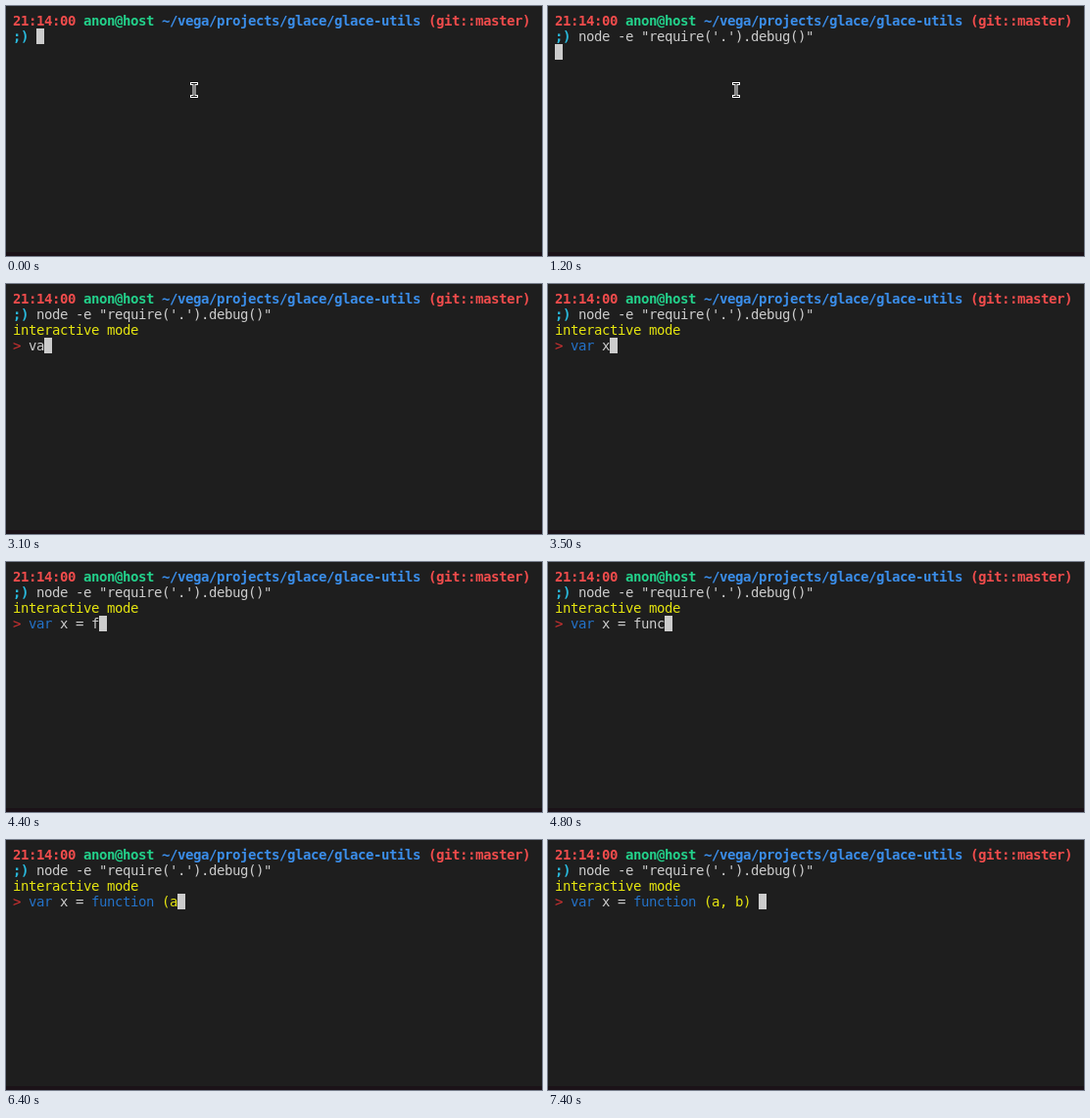
These frames come from a looping animation (547x256 px, 8000 ms). An HTML page with a canvas:

```html
<!DOCTYPE html>
<html lang="en">
<head>
<meta charset="utf-8">
<title>Terminal session</title>
<style>
  html, body { margin: 0; width: 547px; height: 256px; overflow: hidden; background: #1e1e1e; }
  canvas { display: block; }
</style>
</head>
<body>
<canvas id="stage" width="547" height="256"></canvas>
<script>
const ctx = document.getElementById('stage').getContext('2d');
const LOOP = 8000;
const CELL = { w: 8, h: 16, left: 7, top: 7, ascent: 13 };
const FONT = '14px "DejaVu Sans Mono", monospace';
const COLOR = {
  back: '#1e1e1e', edge: '#1b1218', text: '#cccccc', red: '#cd3131', blue: '#2472c8', yellow: '#e5e510',
  boldRed: '#f14c4c', boldGreen: '#23d18b', boldBlue: '#3b8eea', boldCyan: '#29b8db'
};

const COMMAND = 'node -e "require(\'.\').debug()"';
const INPUT = 'var x = function (a, b) ';
const RECALL = 500, ENTER = 1200, READY = 1600, POINTER_MOVE = 1700, POINTER_GONE = 1800;

// [time, characters typed so far]
const KEYS = [
  [3100, 2], [3300, 3], [3400, 4], [3500, 5], [4000, 6], [4200, 8], [4400, 9],
  [4600, 10], [4700, 11], [4800, 12], [5000, 13], [5100, 15], [5300, 16], [5900, 17],
  [6100, 18], [6400, 19], [6500, 20], [6600, 21], [6800, 22], [7200, 23], [7400, 24]
];

const cellX = col => CELL.left + col * CELL.w;
const cellY = row => CELL.top + row * CELL.h;

function rect(color, x, y, w, h) {
  ctx.fillStyle = color;
  ctx.fillRect(x, y, w, h);
}

// Places text on the character grid and returns the next free column.
function print(text, col, row, color, bold = false) {
  ctx.font = (bold ? 'bold ' : '') + FONT;
  ctx.fillStyle = color;
  for (const char of text) {
    ctx.fillText(char, cellX(col++), cellY(row) + CELL.ascent);
  }
  return col;
}

function cursor(col, row) {
  rect(COLOR.text, cellX(col), cellY(row), CELL.w, CELL.h);
}

function pointer(x, y) {
  const beam = (color, grow) => {
    rect(color, x - 3 - grow, y - 7 - grow, 6 + 2 * grow, 1 + 2 * grow);
    rect(color, x - 3 - grow, y + 6 - grow, 6 + 2 * grow, 1 + 2 * grow);
    rect(color, x - 0.5 - grow, y - 7, 1 + 2 * grow, 14);
  };
  beam('#ffffff', 1);
  beam('#111111', 0);
}

function printCode(code, col, row) {
  for (const token of code.match(/\([^)]*\)?|\w+|[^\w(]+/g) || []) {
    const color = token[0] === '(' ? COLOR.yellow
      : /^(var|function)$/.test(token) ? COLOR.blue : COLOR.text;
    col = print(token, col, row, color);
  }
  return col;
}

function drawShell(time) {
  let col = print('21:14:00 ', 0, 0, COLOR.boldRed, true);
  col = print('anon@host ', col, 0, COLOR.boldGreen, true);
  col = print('~/vega/projects/glace/glace-utils ', col, 0, COLOR.boldBlue, true);
  print('(git::master)', col, 0, COLOR.boldRed, true);

  col = print(';) ', 0, 1, COLOR.boldCyan, true);
  if (time >= RECALL) col = print(COMMAND, col, 1, COLOR.text);
  if (time < ENTER) cursor(col, 1);
  else if (time < READY) cursor(0, 2);
}

function drawInteractive(time) {
  const typed = KEYS.reduce((count, [at, length]) => time >= at ? length : count, 0);
  print('interactive mode', 0, 2, COLOR.yellow);
  const col = print('> ', 0, 3, COLOR.red);
  cursor(printCode(INPUT.slice(0, typed), col, 3), 3);
}

function draw(time) {
  rect(COLOR.back, 0, 0, 547, 256);
  rect(COLOR.edge, 0, 252, 547, 4);
  drawShell(time);
  if (time >= READY) drawInteractive(time);
  if (time < POINTER_MOVE) pointer(192, 86);
  else if (time < POINTER_GONE) pointer(372, 93);
}

const start = performance.now();
function tick() {
  draw((performance.now() - start) % LOOP);
  requestAnimationFrame(tick);
}
tick();
</script>
</body>
</html>
```
